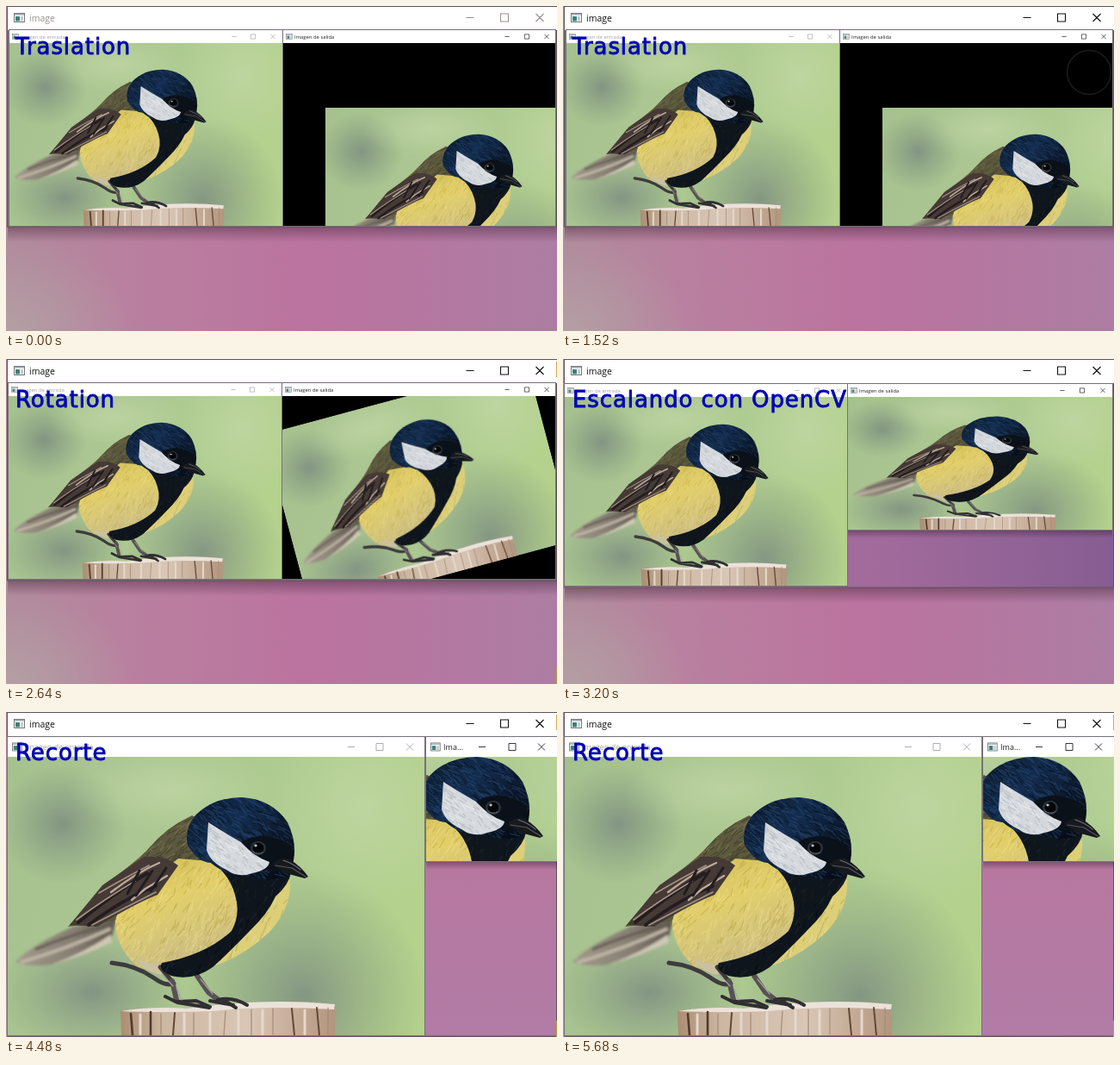
Recreate the animation shown at these times as an HTML page. Size 640 by 377 pixels, loop 5760 ms.

```html
<!DOCTYPE html>
<html lang="es">
<head>
<meta charset="utf-8">
<title>Image transforms</title>
<style>
html, body { margin: 0; width: 100%; height: 100%; overflow: hidden; background: #b878a0; }
svg { display: block; }
#stage { width: 100vw; height: 100vh; }
.ui { font-family: "Open Sans", "Noto Sans", sans-serif; fill: currentColor; }
.label { font: 26px "DejaVu Sans", sans-serif; letter-spacing: .9px; fill: #0606b4; stroke: #0606b4; stroke-width: .9; stroke-linejoin: round; }
.line { fill: none; stroke: currentColor; }
</style>
</head>
<body>
<svg id="stage" viewBox="0 0 640 377" preserveAspectRatio="none" xmlns="http://www.w3.org/2000/svg">
<defs>
  <linearGradient id="wall">
    <stop offset="0" stop-color="#b08b9c"/><stop offset=".22" stop-color="#b9809f"/>
    <stop offset=".55" stop-color="#bb739f"/><stop offset="1" stop-color="#ad7da3"/>
  </linearGradient>
  <radialGradient id="corner"><stop offset="0" stop-color="#b39687"/><stop offset=".5" stop-color="#b08a8c" stop-opacity=".75"/><stop offset="1" stop-color="#b37b99" stop-opacity="0"/></radialGradient>
  <radialGradient id="pale"><stop offset="0" stop-color="#b49fa4"/><stop offset="1" stop-color="#b49fa4" stop-opacity="0"/></radialGradient>
  <linearGradient id="shade" x2="0" y2="1"><stop offset="0" stop-color="#3b1c32" stop-opacity=".42"/><stop offset="1" stop-color="#3b1c32" stop-opacity="0"/></linearGradient>
  <linearGradient id="side"><stop offset="0" stop-color="#3b1c32" stop-opacity=".35"/><stop offset="1" stop-color="#3b1c32" stop-opacity="0"/></linearGradient>
  <linearGradient id="violet"><stop offset="0" stop-color="#ad6f9b"/><stop offset=".6" stop-color="#a06a9b"/><stop offset="1" stop-color="#865d92"/></linearGradient>
  <linearGradient id="rose" x2="0" y2="1"><stop offset="0" stop-color="#a97099"/><stop offset=".4" stop-color="#b8779f"/><stop offset="1" stop-color="#b17ca6"/></linearGradient>
  <linearGradient id="green" x2="1" y2=".2"><stop offset="0" stop-color="#a5c18e"/><stop offset=".35" stop-color="#abc692"/><stop offset=".75" stop-color="#afcd90"/><stop offset="1" stop-color="#b4d18d"/></linearGradient>
  <radialGradient id="grey"><stop offset="0" stop-color="#7b8d80" stop-opacity=".85"/><stop offset="1" stop-color="#84967f" stop-opacity="0"/></radialGradient>
  <radialGradient id="glow"><stop offset="0" stop-color="#c1d7a5" stop-opacity=".75"/><stop offset="1" stop-color="#c1d7a5" stop-opacity="0"/></radialGradient>
  <linearGradient id="wood"><stop offset="0" stop-color="#ab8d72"/><stop offset=".2" stop-color="#ccb7a2"/><stop offset=".6" stop-color="#d9c6b6"/><stop offset="1" stop-color="#b3967e"/></linearGradient>
  <linearGradient id="yolk" x2=".4" y2="1"><stop offset="0" stop-color="#cdbb53"/><stop offset=".45" stop-color="#e2cf6a"/><stop offset="1" stop-color="#c9bb86"/></linearGradient>
  <linearGradient id="navy" x2="1" y2=".7"><stop offset="0" stop-color="#0b1728"/><stop offset=".45" stop-color="#142d50"/><stop offset="1" stop-color="#070d17"/></linearGradient>
  <linearGradient id="tail"><stop offset="0" stop-color="#a29a8b"/><stop offset=".6" stop-color="#857d71"/><stop offset="1" stop-color="#5d564e"/></linearGradient>
  <filter id="soft"><feGaussianBlur stdDeviation=".6"/></filter>
  <filter id="far"><feGaussianBlur stdDeviation="1.8"/></filter>
  <symbol id="photo" viewBox="2 52 484 323" preserveAspectRatio="none"></symbol>
</defs>
<g id="desk">
  <rect width="640" height="377" fill="url(#wall)"/>
  <ellipse cx="610" cy="10" rx="190" ry="240" fill="url(#corner)"/>
  <ellipse cx="0" cy="377" rx="150" ry="110" fill="url(#pale)"/>
</g>
</svg>
<script>
const stage = document.getElementById('stage');
const LOOP = 5760;
let seed = 7;
const rnd = () => (seed = seed * 16807 % 2147483647) / 2147483647;
const rect = (x, y, w, h, fill, more = '') =>
  `<rect x="${x}" y="${y}" width="${w}" height="${h}" fill="${fill}" ${more}/>`;
const oval = (x, y, rx, ry, fill) => `<ellipse cx="${x}" cy="${y}" rx="${rx}" ry="${ry}" fill="${fill}"/>`;
const shape = (d, fill) => `<path d="${d}" fill="${fill}"/>`;
const stroke = (d, color, w = 1) =>
  `<path d="${d}" fill="none" stroke="${color}" stroke-width="${w}" stroke-linecap="round" stroke-linejoin="round"/>`;

// Short plumage strokes, kept inside a shape.
function plumage(id, d, n, [x, y, w, h], angle, len, colors) {
  const paths = colors.map(() => '');
  for (let i = 0; i < n; i++) {
    const a = angle + (rnd() - .5) * .8, l = len * (.5 + rnd());
    paths[i % colors.length] += `M${(x + rnd() * w).toFixed(1)} ${(y + rnd() * h).toFixed(1)}l${(l * Math.cos(a)).toFixed(1)} ${(l * Math.sin(a)).toFixed(1)}`;
  }
  return `<clipPath id="${id}"><path d="${d}"/></clipPath><g clip-path="url(#${id})" opacity=".5">` +
    paths.map((p, i) => stroke(p, colors[i], 1.1)).join('') + '</g>';
}

function drawPhoto() {
  const tail = 'M11 290Q30 270 78 249L128 240L122 266Q85 284 52 293Q25 296 11 290Z';
  const back = 'M216 120Q186 134 166 158Q150 175 118 197L72 249L124 243Q165 225 198 180L232 180L235 130Z';
  const wing = 'M160 168L112 201L74 247L106 249Q150 222 176 212L200 178Q185 165 160 168Z';
  const body = 'M200 170Q180 185 176 200L148 214Q126 228 127 248Q130 275 152 295Q180 306 215 302L262 268L275 215L250 174Z';
  const flank = 'M329 190Q335 222 308 253Q279 282 243 294L262 258L300 208Z';
  const bib = 'M240 174Q262 188 284 189L308 178L331 186Q329 200 313 214Q304 234 284 253Q258 280 240 296Q218 312 192 306Q176 300 181 291Q232 282 262 254Q273 234 266 212Q260 190 240 174Z';
  const head = 'M211 154Q207 137 219 121Q240 99 274 99Q309 101 327 128Q338 151 334 172L329 190Q305 198 284 190Q258 192 238 175Q222 174 211 154Z';
  const cheek = 'M235 128Q252 139 273 151Q288 168 306 174Q305 183 286 187Q270 193 256 183Q237 174 233 160Z';
  const post = 'M133 346Q185 342 220 345L255 339Q335 333 382 339L382 376L134 376Z';
  let s = rect(2, 52, 484, 323, 'url(#green)') +
    oval(65, 130, 75, 70, 'url(#grey)') + oval(345, 330, 140, 150, 'url(#grey)') +
    oval(100, 325, 110, 75, 'url(#grey)') + oval(415, 110, 110, 120, 'url(#glow)') +
    oval(190, 90, 120, 50, 'url(#glow)');

  s += '<g filter="url(#soft)">' + shape(post, 'url(#wood)') +
    shape('M133 347Q170 341 210 344Q300 331 382 339L381 345Q300 340 240 347Q180 349 133 347Z', '#ebe2da') +
    stroke('M168 348V375M145 350L147 375', '#503a2b', 2.6) + stroke('M196 349L194 375M332 344L335 375M361 343L364 375', '#62483a', 2) +
    stroke('M180 350V374M218 349V375M255 347L253 375M285 345V375M310 344V374M374 343V375', '#a58b77', 1.2) +
    stroke('M156 351V374M207 350V374M237 349V375M270 347V374M298 346V375M347 346V374', '#e6d8ca', 3) + '</g>';

  s += '<g filter="url(#far)">' + shape(tail, 'url(#tail)') + stroke('M18 290Q70 275 120 252', '#c0b6a6', 4) +
    stroke('M35 275Q75 258 120 247', '#625b50', 3) +
    shape('M52 293Q90 280 122 258L123 267Q85 285 52 293Z', '#cfc8b5') + '</g><g filter="url(#soft)">' +
    shape(back, '#5d593e') + plumage('c-back', back, 180, [150, 122, 85, 65], 2.4, 9, ['#8d8454', '#2f3025']) +
    shape(body, 'url(#yolk)') + plumage('c-body', body, 520, [126, 172, 150, 132], 2.1, 9, ['#f2e391', '#b8a23e', '#e6d68c']) +
    shape(wing, '#453a35') +
    stroke('M84 244Q124 211 164 187M96 247Q137 216 174 202', '#241d1f', 4) +
    stroke('M82 241Q113 218 150 196M100 247Q136 228 174 209M108 210Q135 194 166 178', '#a39184', 1.7) +
    stroke('M122 209Q152 186 178 175M146 218L162 205L187 190', '#bca999', 2.4) +
    stroke('M155 184L141 211M170 184L151 213M186 181L168 208', '#211c20', 3) +
    shape(flank, '#dccf78') + plumage('c-flank', flank, 130, [245, 190, 86, 101], 2.1, 8, ['#eee6ad', '#a99952']) +
    shape('M151 286Q165 292 181 293L190 305Q165 307 151 286Z', '#cbc1a0');

  s += stroke('M179 296L195 315Q186 319 171 308Q151 294 123 291', '#3e3b3c', 5) +
    stroke('M193 312L198 334M222 306L235 325L248 335', '#575254', 6) +
    stroke('M185 330L199 337L236 343M199 336L221 335L237 342M237 335L264 340M246 334Q263 330 280 340M251 333L267 343', '#302e32', 4) +
    stroke('M181 304L194 318M198 320L204 334M226 310L240 327', '#aaa09b', 1.2);

  s += shape(bib, '#0f151c') + plumage('c-bib', bib, 230, [178, 176, 153, 132], 2, 8, ['#22384f', '#05090f', '#28231b']) +
    shape(head, 'url(#navy)') + plumage('c-head', head, 460, [207, 99, 130, 94], .6, 8, ['#285482', '#040a14', '#2c5079']) +
    shape('M273 151Q302 135 333 156L329 183Q315 190 298 178Z', '#0b1119') +
    shape(cheek, '#d5d9dd') + plumage('c-cheek', cheek, 180, [232, 128, 75, 64], .7, 7, ['#f4f5f5', '#a5adb6']) +
    oval(293, 158, 9, 8, '#2b343d') + oval(293, 158, 6.5, 6.5, '#050608') + oval(290, 155, 1.7, 1.4, '#b4c2c8') +
    stroke('M287 162Q292 166 298 163', '#68757c', 1) +
    shape('M309 177Q318 168 328 170Q343 179 351 191L347 193L325 187Z', '#17191d') +
    stroke('M313 178L332 181L348 191', '#52585e', 1.2) + stroke('M322 172Q334 176 342 183', '#68707a', 1.2) + '</g>';
  document.getElementById('photo').innerHTML = s;
}

const icon = (x, y, s) =>
  `<g transform="translate(${x} ${y}) scale(${s})">` + rect(.5, .5, 12, 10, '#fff', 'stroke="#777"') +
  rect(1, 1, 11, 1.7, '#a9b0b8') + rect(2, 4, 5, 5.5, '#3b8279') + rect(8, 4, 3, 5.5, '#c6cdd0') + '</g>';

function buttons([a, b, c], y, r, w) {
  return `<path class="line" stroke-width="${w}" d="M${a - r} ${y}h${2 * r}M${b - r} ${y - r}h${2 * r}v${2 * r}h${-2 * r}zM${c - r} ${y - r}l${2 * r} ${2 * r}m0 ${-2 * r}l${-2 * r} ${2 * r}"/>`;
}

const caption = (x, y, size, text) => `<text class="ui" x="${x}" y="${y}" font-size="${size}">${text}</text>`;

// A small window: title bar plus a clipped picture.
function pane(p) {
  const top = p.y + p.bar, mid = p.y + p.bar / 2, k = p.bar / 23;
  const [px, py, pw, ph] = p.pic || [0, 0, p.w, p.h];
  const turn = p.turn ? `transform="rotate(${p.turn} ${p.w / 2} ${p.h / 2})"` : '';
  return rect(p.x - .5, p.y - .5, p.w + 1, p.bar + p.h + 1, '#fff', 'stroke="#77707a" stroke-width="1"') +
    `<svg x="${p.x}" y="${top}" width="${p.w}" height="${p.h}">` + rect(0, 0, p.w, p.h, '#000') +
    `<use href="#photo" x="${px}" y="${py}" width="${pw}" height="${ph}" ${turn}/></svg>` +
    `<g color="${p.dim ? '#a5a5a5' : '#222'}">` + icon(p.x + 5 * k, mid - 5 * k, .9 * k) +
    caption(p.x + 20 * k, mid + 3.2 * k, 9 * k, p.title) + buttons(p.keys, mid, 4 * k, Math.max(.7, .9 * k)) + '</g>';
}

function scene({ label, right = 640, bottom, inner, panes, edge, extra = '' }) {
  const w = right - 2, c = right - 20;
  return rect(2, bottom, w, 18, 'url(#shade)') + (right < 640 ? rect(right, 4, 12, bottom - 4, 'url(#side)') : '') +
    rect(1.5, .5, w, bottom - .5, inner, 'stroke="#5c555b"') + rect(2, 1, w, 27, '#fff') +
    `<g class="main">` + icon(9, 8, 1) + caption(27, 18, 10.5, 'image') + buttons([c - 81, c - 41, c], 13.5, 4.5, 1.1) + '</g>' +
    panes.map(p => pane(p) + (inner[0] === 'u' && p.y + p.bar + p.h < bottom - 9 ? rect(p.x, p.y + p.bar + p.h + 1, p.w, 9, 'url(#shade)') : '')).join('') + extra +
    (edge ? rect(639, 3, 1, 18, '#d2a94e') + rect(639, 358, 1, 19, '#b99a3c') : '') +
    `<text class="label" x="11" y="56">${label}</text>`;
}

const IN = 'Imagen de entrada', OUT = 'Imagen de salida';
const scenes = [
  { end: 1840, label: 'Traslation', bottom: 256, inner: '#777', panes: [
    { x: 4, y: 28, w: 317, bar: 15, h: 212, title: IN, dim: 1, keys: [265, 287, 310] },
    { x: 322, y: 28, w: 316, bar: 15, h: 212, title: OUT, keys: [582, 605, 628], pic: [49, 75, 317, 212] }],
    extra: '<circle id="ring" cx="611" cy="77" r="25.5" fill="none" stroke="#1c1c1c" stroke-width="1.5"/>' },
  { end: 2960, label: 'Rotation', bottom: 257, inner: '#777', edge: 1, panes: [
    { x: 3, y: 28, w: 317, bar: 15, h: 212, title: IN, dim: 1, keys: [264, 286, 309] },
    { x: 321, y: 28, w: 317, bar: 15, h: 212, title: OUT, keys: [582, 605, 628], turn: -15 }] },
  { end: 3680, label: 'Escalando con OpenCV', bottom: 265, inner: 'url(#violet)', panes: [
    { x: 2, y: 29, w: 328, bar: 15, h: 219, title: IN, dim: 1, keys: [272, 295, 320] },
    { x: 331, y: 29, w: 307, bar: 15, h: 154, title: OUT, keys: [580, 603, 627] }] },
  { end: 4320, label: 'Escalando con Imutils', right: 504, bottom: 250, inner: 'url(#rose)', panes: [
    { x: 3, y: 28, w: 200, bar: 21, h: 133, title: OUT + '1', keys: [127, 157, 187] },
    { x: 204, y: 28, w: 299, bar: 21, h: 200, title: OUT + '2', dim: 1, keys: [427, 457, 487] }] },
  { end: LOOP, label: 'Recorte', bottom: 376, inner: 'url(#rose)', edge: 1, panes: [
    { x: 2, y: 29, w: 484, bar: 23, h: 323, title: IN, dim: 1, keys: [401, 434, 469] },
    { x: 488, y: 29, w: 152, bar: 23, h: 121, title: 'Ima...', keys: [553, 588, 622], pic: [-213, -47, 484, 323] }] }
];

drawPhoto();
const layers = scenes.map(s => {
  const g = document.createElementNS(stage.namespaceURI, 'g');
  g.innerHTML = scene(s);
  stage.append(g);
  return g;
});
const mains = stage.querySelectorAll('.main');
const ring = document.getElementById('ring');
let last = '';

function render(t) {
  const now = scenes.findIndex(s => t < s.end);
  const idle = t < 240, click = t >= 1440 && t < 1680;
  const state = [now, idle, click].join();
  if (state === last) return;
  last = state;
  layers.forEach((g, i) => g.setAttribute('display', i === now ? 'inline' : 'none'));
  mains.forEach(m => m.setAttribute('color', idle ? '#999190' : '#111'));
  ring.setAttribute('display', click ? 'inline' : 'none');
}

const start = performance.now();
function tick() {
  render((performance.now() - start) % LOOP);
  requestAnimationFrame(tick);
}
tick();
</script>
</body>
</html>
```
